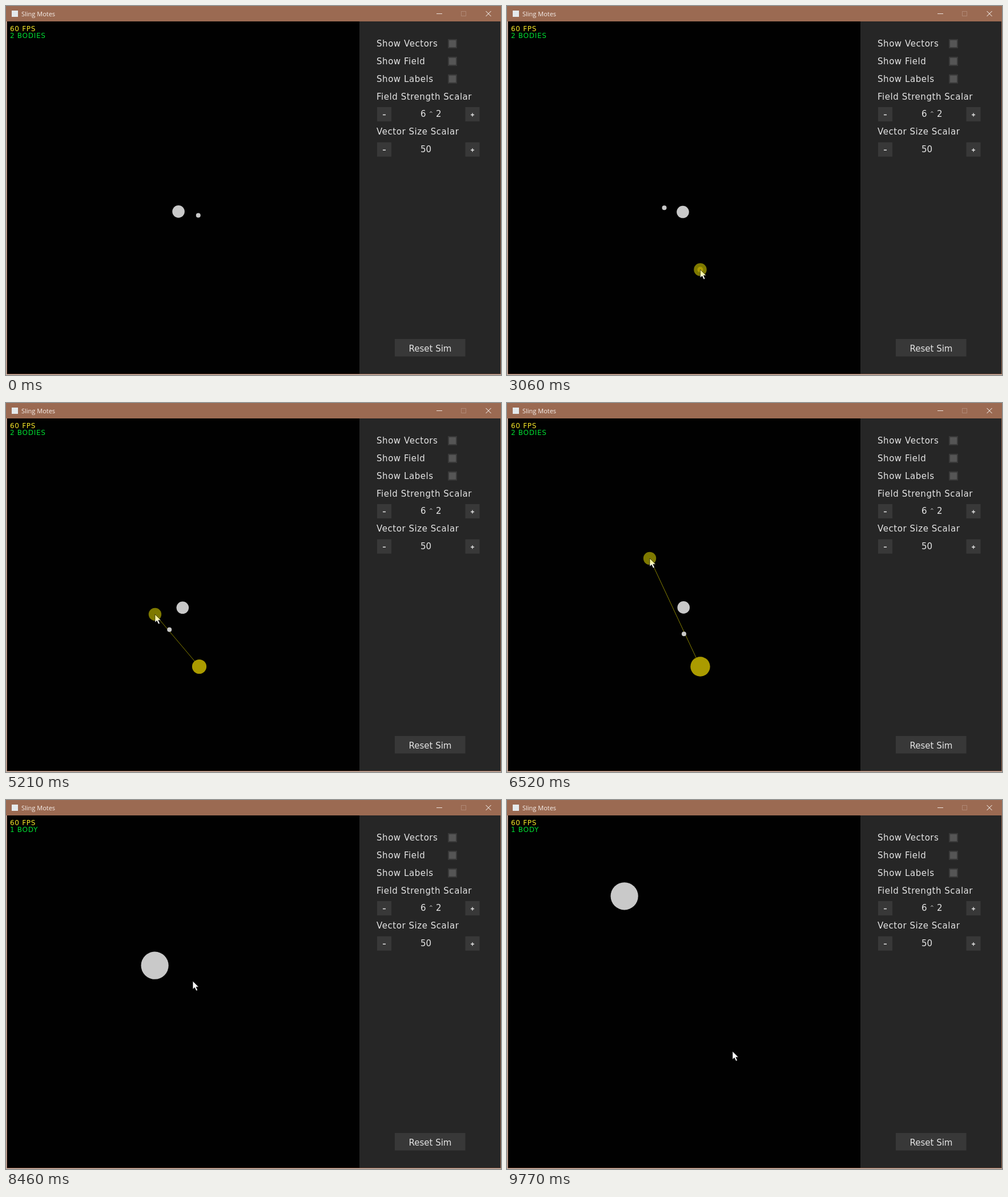
Animation of 867x646 px, one loop 9.84 s. Source, as an HTML page:

```html
<!DOCTYPE html>
<html lang="en">
<head>
<meta charset="utf-8">
<title>Sling Motes</title>
<style>
html, body { margin: 0; width: 100%; height: 100%; overflow: hidden; background: #000; }
svg { display: block; }
text { font: 15px "DejaVu Sans", sans-serif; fill: #e4e4e4; white-space: pre; }
.label { letter-spacing: .55px; }
.stat { font-size: 12px; letter-spacing: .7px; }
.title { font: 11px "Open Sans", sans-serif; fill: #f6efeb; }
.button { fill: #383838; }
.check { fill: #555; stroke: #3a3a3a; stroke-width: 2; }
.body { fill: #c9c9c9; }
.icon { fill: none; stroke: #fff; }
</style>
</head>
<body>
<svg width="867" height="646" viewBox="0 0 867 646">
  <defs>
    <linearGradient id="tint" x2="0" y2="1">
      <stop offset=".4" stop-color="#f8f59a"/>
      <stop offset=".75" stop-color="#fff"/>
    </linearGradient>
  </defs>
  <rect width="867" height="646" fill="#cfc2bb"/>
  <rect x="1" width="866" height="645" fill="#9b6a52"/>
  <rect width="1" height="27" fill="#9b6a52"/>
  <rect x="2" y="27" width="617" height="617" fill="#010101"/>
  <rect x="619" y="27" width="247" height="617" fill="#262626"/>

  <rect x="10" y="8" width="11" height="11" fill="#e4e9ec"/>
  <text class="title" x="27" y="17.5">Sling Motes</text>
  <path class="icon" d="M754 13.5h10" opacity=".8"/>
  <path class="icon" d="M840.5 9l9 9m0-9l-9 9"/>
  <path class="icon" d="M797.5 9.5h8v8h-8z" opacity=".2"/>

  <text class="stat" x="7" y="44" style="fill:#f5e628">60 FPS</text>
  <text class="stat" id="count" x="7" y="56" style="fill:#00dc32"></text>

  <g id="panel"></g>
  <g id="stepper">
    <rect class="button" x="650" y="177" width="25" height="25"/>
    <rect class="button" x="804.5" y="177" width="25" height="25"/>
    <path d="M660 190.5h5M814 190.5h6m-3-3v6" stroke="#e2e2e2" stroke-width="1.4"/>
  </g>
  <use href="#stepper" y="61.7"/>
  <text x="726" y="194">6</text>
  <text x="741" y="191" style="font-size:8px">^</text>
  <text x="753" y="194">2</text>
  <text x="726" y="255.5">50</text>

  <rect class="button" x="681" y="583" width="123.5" height="30.5"/>
  <text x="705.5" y="605">Reset Sim</text>

  <line id="aim" stroke="#857f00"/>
  <circle id="halo" r="11.2" fill="#7e7900"/>
  <circle id="big" class="body" r="10.8"/>
  <circle id="small" class="body" r="4"/>
  <circle id="ball"/>
  <path id="cursor" d="M0 0V14.2L3.3 11.2L6 17L8.4 16L5.8 10.2H10.3Z" stroke="#000" stroke-width=".6"/>
</svg>
<script>
// Times in seconds
const LOOP = 9.84, PRESS = 1.615, RELEASE = 6.86, SWALLOW = 7.2, MERGE = 7.39;
const RAD = Math.PI / 180;
const START = [338.5, 461.5];

const $ = id => document.getElementById(id);
const set = (id, attrs) => {
  for (const k in attrs) $(id).setAttribute(k, attrs[k]);
};
const show = (id, on) => set(id, { visibility: on ? "visible" : "hidden" });

const labels = ["Show Vectors", "Show Field", "Show Labels",
  "Field Strength Scalar", "", "Vector Size Scalar"];
$("panel").innerHTML = labels.map((label, i) => {
  const y = 71 + 30.85 * i;
  const box = i < 3 ? `<rect class="check" x="775" y="${y - 12}" width="14" height="14"/>` : "";
  return `<text class="label" x="649" y="${y}">${label}</text>${box}`;
}).join("");

// Pointer stops: time, x, y
const stops = [
  [0.07, 399, 588], [0.95, ...START], [3.55, ...START], [5.21, 261, 370],
  [6.18, 245, 306], [6.52, 250, 272], [7.64, 268, 266], [8.46, 327, 317],
  [9.47, 472, 388], [9.77, 395, 440]
];

function pointerAt(t) {
  const i = stops.findIndex(s => s[0] > t);
  if (i < 1) return stops.at(i).slice(1);
  const [a, b] = [stops[i - 1], stops[i]];
  const u = (t - a[0]) / (b[0] - a[0]);
  return [1, 2].map(c => a[c] + (b[c] - a[c]) * u);
}

// Kepler ellipse around a slowly drifting centre of mass
function pairAt(t) {
  const a = 36.9, e = 0.26, share = 0.05, tilt = 85 * RAD;
  const mean = (39.2 * t - 66) * RAD;
  let E = mean;
  for (let i = 0; i < 10; i++) E = mean + e * Math.sin(E);
  const p = a * (Math.cos(E) - e);
  const q = a * Math.sqrt(1 - e * e) * Math.sin(E);
  const dx = p * Math.cos(tilt) - q * Math.sin(tilt);
  const dy = -p * Math.sin(tilt) - q * Math.cos(tilt);
  const cx = 303.8 + 0.84 * t - share * dx;
  const cy = 360.2 - share * dy;
  return { big: { cx, cy }, small: { cx: cx + dx, cy: cy + dy } };
}

// Grows while held, then flies; each collision changes its size
function ballAt(t) {
  if (t < RELEASE) return { cx: START[0], cy: START[1], r: Math.max(0, 3.5 * (t - PRESS)) };
  if (t < MERGE) {
    const s = t - RELEASE;
    return { cx: START[0] - 60 * s, cy: START[1] - 137 * s, r: t < SWALLOW ? 18.4 : 19 };
  }
  const s = t - MERGE;
  return { cx: 305.6 - 42 * s, cy: 389 - 92.7 * s, r: 24.1 };
}

function draw(t) {
  const [x, y] = pointerAt(t);
  const { big, small } = pairAt(t);
  const held = t >= PRESS && t < RELEASE;

  set("big", big);
  set("small", small);
  set("ball", { ...ballAt(t), fill: held ? "#ab9b00" : "#c9c9c9" });
  set("aim", { x1: START[0], y1: START[1], x2: x, y2: y });
  set("halo", { cx: x, cy: y });
  set("cursor", { transform: `translate(${x} ${y})`, fill: held ? "url(#tint)" : "#fff" });

  show("big", t < MERGE);
  show("small", t < SWALLOW);
  show("ball", t >= PRESS);
  show("aim", held);
  show("halo", held);
  show("cursor", t >= stops[0][0]);

  $("count").textContent = t >= MERGE ? "1 BODY"
    : t >= RELEASE && t < SWALLOW ? "3 BODIES" : "2 BODIES";
}

const begin = performance.now();
function tick() {
  draw((performance.now() - begin) / 1000 % LOOP);
  requestAnimationFrame(tick);
}
tick();
</script>
</body>
</html>
```
